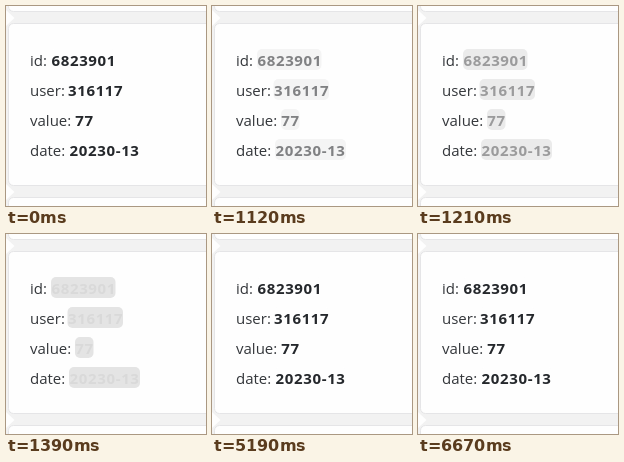
These frames come from a looping animation (200x200 px, 6760 ms). An HTML page:

```html
<!DOCTYPE html>
<html lang="en">
<head>
<meta charset="utf-8">
<title>Redacted fields</title>
<style>
  html, body { margin: 0; width: 100%; height: 100%; overflow: hidden; background: #f2f2f2; }
  svg { display: block; width: 100%; height: 100%; }
  .card { fill: #fefefe; stroke: #e5e5e7; }
  .notch { fill: #fefefe; }
  text { font-family: "Open Sans", "Noto Sans", sans-serif; font-size: 15px; }
  .label { fill: #34373b; }
  .value { font-weight: 700; letter-spacing: .65px; animation: fade 6760ms step-end infinite; }
  .mask { fill: #fefefe; animation: cover 6760ms step-end infinite; }

  @keyframes fade {
    0% { fill: #25282c; }
    15.237% { fill: #606164; }
    16.568% { fill: #808183; }
    17.899% { fill: #9b9b9c; }
    19.231% { fill: #bcbcbc; }
    20.562% { fill: #d9d9d9; }
    76.775%, 100% { fill: #25282c; }
  }
  @keyframes cover {
    0% { fill: #fefefe; }
    15.237% { fill: #fcfcfc; }
    16.568% { fill: #f4f4f4; }
    17.899% { fill: #ebebeb; }
    19.231% { fill: #e8e8e8; }
    20.562% { fill: #e4e4e4; }
    76.775%, 100% { fill: #fefefe; }
  }
</style>
</head>
<body>
<svg viewBox="0 0 200 200">
  <defs>
    <rect id="card" class="card" x="2.5" y="17.5" width="260" height="162" rx="5"/>
    <path id="notch" class="notch" d="M0 4L8.5 12L0 20Z"/>
  </defs>
  <use href="#notch"/>
  <use href="#notch" y="174"/>
  <use href="#card" y="-174"/>
  <use href="#card"/>
  <use href="#card" y="174"/>

  <g>
    <rect class="mask" x="45" y="43" width="64.5" height="21" rx="5"/>
    <text class="label" x="24" y="60">id:</text>
    <text class="value" x="45.5" y="60">6823901</text>
  </g>
  <g transform="translate(0 30)">
    <rect class="mask" x="61.5" y="43" width="55.5" height="21" rx="5"/>
    <text class="label" x="24" y="60">user:</text>
    <text class="value" x="62" y="60">316117</text>
  </g>
  <g transform="translate(0 60)">
    <rect class="mask" x="69" y="43" width="18.5" height="21" rx="5"/>
    <text class="label" x="24" y="60">value:</text>
    <text class="value" x="69.2" y="60">77</text>
  </g>
  <g transform="translate(0 90)">
    <rect class="mask" x="63" y="43" width="71" height="21" rx="5"/>
    <text class="label" x="24" y="60">date:</text>
    <text class="value" x="63.6" y="60">20230-13</text>
  </g>
</svg>
</body>
</html>
```
